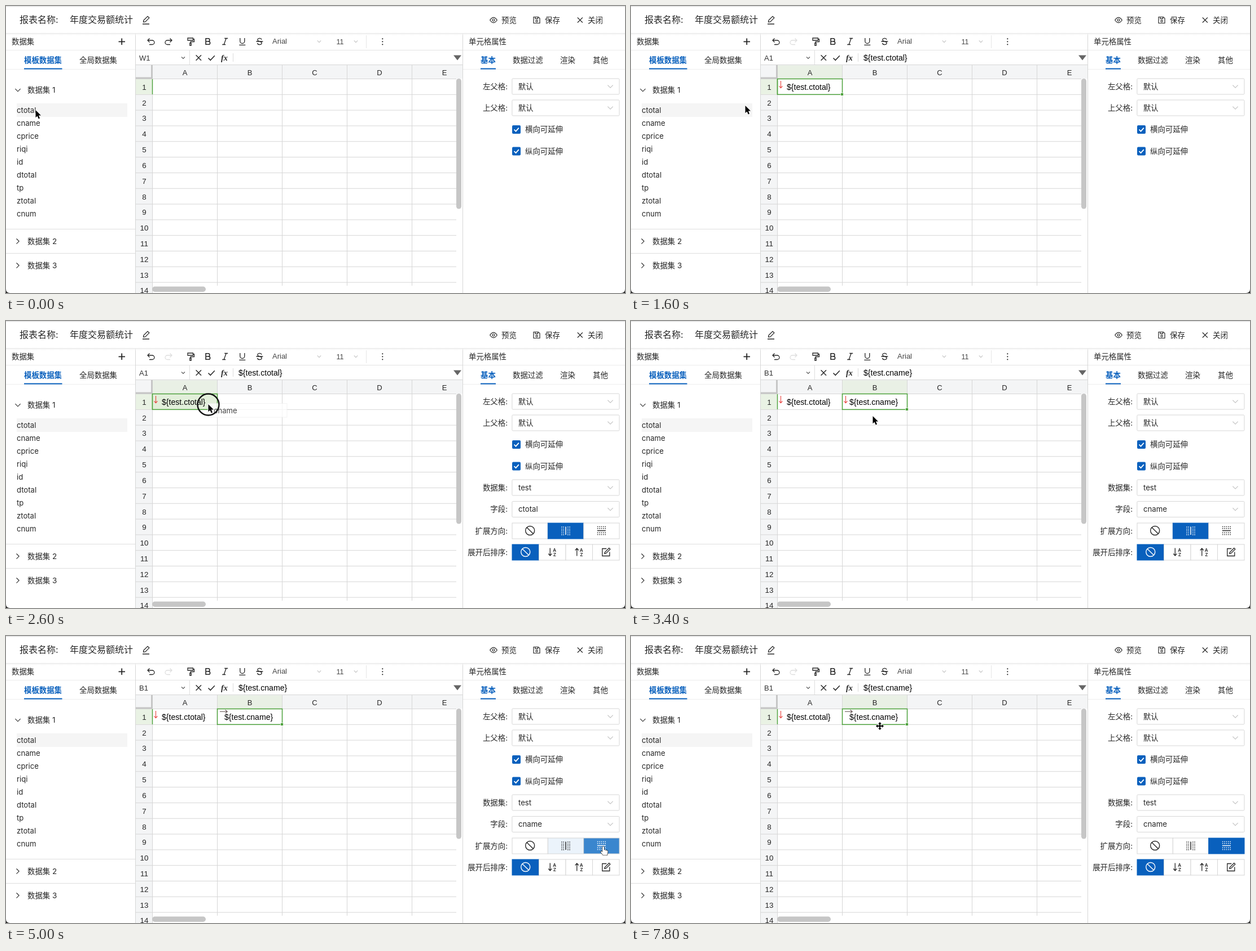
An HTML page that plays this animation: 1097 px wide and 510 px high, repeating every 8 s.

```html
<!DOCTYPE html>
<html lang="zh-CN">
<head>
<meta charset="utf-8">
<style>
  html, body { margin: 0; width: 100%; height: 100%; overflow: hidden; background: #fff; }
  svg { display: block; width: 1097px; height: 510px; }
  text { font-family: Inter, "Noto Sans CJK SC", "Noto Sans CJK", sans-serif; white-space: pre; }
  .sheet { font-family: "Liberation Sans", Arial, sans-serif; }
</style>
</head>
<body>
<svg id="stage" viewBox="0 0 1097 510" xmlns="http://www.w3.org/2000/svg"></svg>
<script>
const INK = '#262626', BLUE = '#0960bd', GREEN = '#4ba03a', LINE = '#d6d6d6';
const STEP = 200, LOOP = 8000;
const COL = 115, ROW = 27.82, LEFT = 259.5, TOP = 129.5;

// Drawing helpers; text is placed by its vertical centre.
const label = (x, cy, str, { size = 13.4, fill = INK, weight = 400, cls = '', anchor = 'start', extra = '' } = {}) =>
  `<text x="${x}" y="${cy + size * 0.365}" font-size="${size}" fill="${fill}" font-weight="${weight}" class="${cls}" text-anchor="${anchor}" ${extra}>${str}</text>`;
const cell = (x, cy, str, opt = {}) => label(x, cy, str, { size: 14.1, fill: '#000', cls: 'sheet', ...opt });
const rect = (x, y, w, h, fill, extra = '') =>
  `<rect x="${x}" y="${y}" width="${w}" height="${h}" fill="${fill}" ${extra}/>`;
const path = (d, stroke = INK, width = 1.2, extra = '') =>
  `<path d="${d}" fill="none" stroke="${stroke}" stroke-width="${width}" ${extra}/>`;
const at = (x, y, body, extra = '') => `<g transform="translate(${x} ${y}) ${extra}">${body}</g>`;
const hline = (x1, x2, y, color = LINE) => path(`M${x1} ${y}H${x2}`, color, 1);
const vline = (x, y1, y2, color = LINE) => path(`M${x} ${y1}V${y2}`, color, 1);
const chevron = (x, y, color, s = 4) => path(`M${x - s} ${y - s / 2}l${s} ${s}l${s} ${-s}`, color, 1.1);
const cross = (x, y, s, w) => path(`M${x - s} ${y - s}l${2 * s} ${2 * s}m0 ${-2 * s}l${-2 * s} ${2 * s}`, INK, w);

const icons = {
  pencil: path('M-6 7.5H6M-4.5 4L-4 .8L3 -6.2L5.8 -3.4L-1.2 3.6Z', INK, 1.3),
  eye: path('M-6.3 0Q0 -9.4 6.3 0Q0 9.4 -6.3 0Z') + '<circle r="2" fill="none" stroke="#262626" stroke-width="1.2"/>',
  save: path('M-5.5 -5.5H3L5.5 -3V5.5H-5.5ZM-2.5 -5.5V-2.3H2V-5.5') + '<circle cy="1.8" r="1.7" fill="none" stroke="#262626" stroke-width="1.1"/>',
  undo: path('M-2.5 -6L-6 -2.5L-2.5 1M-6 -2.5H2.2A3.7 3.7 0 0 1 2.2 5H-3', 'currentColor', 1.3),
  roller: path('M-5 -6H4.5V-2H-5ZM4.5 -4H6.5V.5H0V3M-1.2 3H1.2V7H-1.2Z', INK, 1.3),
  bold: path('M-3.5 -5.2H.7A2.5 2.5 0 0 1 .7 0H-3.5ZM-3.5 0H1.4A2.6 2.6 0 0 1 1.4 5.3H-3.5Z', INK, 1.6),
  italic: path('M-1 -5.5H5M-5 5.5H1M2 -5.5L-2 5.5', INK, 1.3),
  underline: path('M-4 -6V-.5A4 4 0 0 0 4 -.5V-6M-5.5 6.3H5.5', INK, 1.3),
  strike: path('M3.8 -3.4Q2.6 -5.8 0 -5.6Q-3.8 -5.2 -3.5 -2.6Q-3.2 -.8 0 0Q4 .8 3.8 3Q3.4 5.7 0 5.7Q-3.4 5.6 -4 3M-6 0H6', INK, 1.3),
  ban: path('M-8 0A8 8 0 1 1 8 0A8 8 0 1 1 -8 0M-5.6 -5.6L5.6 5.6', 'currentColor', 1.4),
  columns: path('M-7 -7V8M-3.8 -7V8M3.8 -7V8M7 -7V8', 'currentColor', 1.5, 'stroke-dasharray="1.5 1.9"') + path('M0 -7V7.5', 'currentColor', 1.5),
  rows: path('M-7.5 -7H8M-7.5 -3.8H8M-7.5 3.8H8M-7.5 7H8', 'currentColor', 1.5, 'stroke-dasharray="1.5 1.9"') + path('M-7.5 0H7.5', 'currentColor', 1.5),
  form: path('M1 -6H-6.5V7H6.5V0M-2.5 3L-2 .5L5.5 -7L7.5 -5L0 2.5Z', 'currentColor', 1.3),
};
const sortIcon = up =>
  path(up ? 'M-4 7V-6M-7 -3L-4 -6.5L-1 -3' : 'M-4 -7V6M-7 3L-4 6.5L-1 3', INK, 1.3) +
  label(4, -3.6, 'A', { size: 8, anchor: 'middle', weight: 600 }) + label(4, 4.4, 'Z', { size: 8, anchor: 'middle', weight: 600 });
const tinted = (x, y, icon, color) => `<g color="${color}">${at(x, y, icon)}</g>`;

function header() {
  return rect(0, 0, 1097, 48, '#fff') + hline(0, 1097, 0.8, '#d4d4d4') +
    label(24, 24, '报表名称:', { size: 16 }) + label(113, 24, '年度交易额统计', { size: 16 }) +
    at(248, 24.5, icons.pencil) + at(864, 25, icons.eye) + at(940.5, 25, icons.save) + cross(1017.3, 25, 4.5, 1.2) +
    label(878, 25, '预览') + label(955, 25, '保存') + label(1031, 25, '关闭') +
    rect(0, 48, 1097, 5, 'url(#shade)');
}

function datasets() {
  const fields = ['ctotal', 'cname', 'cprice', 'riqi', 'id', 'dtotal', 'tp', 'ztotal', 'cnum'];
  return label(10, 63, '数据集', { weight: 500 }) + path('M199.5 63.3H211M205.2 57.5V69', INK, 1.8) +
    hline(0, 229, 78.5, '#ebebeb') + hline(0, 229, 112.5, '#ededed') +
    label(32, 96, '模板数据集', { fill: BLUE, weight: 700 }) + label(130, 96, '全局数据集') +
    rect(32, 110.5, 67.5, 2, BLUE) +
    chevron(21, 149.5, INK, 4.6) + label(38, 149, '数据集 1') +
    rect(19, 173, 196, 24, '#f5f5f5') +
    fields.map((name, i) => label(19, 185 + i * 23.05, name, { size: 13.1 })).join('') +
    [2, 3].map((n, i) => hline(0, 229, 396.5 + i * 43, '#dedede') +
      path(`M18.5 ${413.5 + i * 43}l4.6 4.6l-4.6 4.6`, INK, 1.1) + label(38, 418 + i * 43, `数据集 ${n}`)).join('') +
    vline(229.5, 49, 510);
}

function toolbar() {
  const tools = ['roller', 'bold', 'italic', 'underline', 'strike'];
  return tinted(257, 63.5, icons.undo, INK) +
    tools.map((name, i) => at(327 + i * 30.6, 63, icons[name])).join('') +
    label(472, 62, 'Arial', { size: 13, cls: 'sheet', fill: '#444' }) + chevron(555, 63, '#c4c4c4', 3.2) +
    label(585.5, 63.5, '11', { size: 12.5, cls: 'sheet', fill: '#444' }) + chevron(620, 63, '#c4c4c4', 3.2) +
    vline(638.5, 52, 75, '#e6e6e6') +
    [-5, 0, 5].map(d => `<circle cx="667.3" cy="${63.3 + d}" r="1.1" fill="${INK}"/>`).join('') +
    hline(230, 809, 78.5, '#e2e2e2') + vline(325.5, 79, 104, '#dedede') + chevron(314, 92, '#555', 3) +
    cross(341.3, 92, 4.7, 1.4) + path('M358.5 92.5l3.8 3.8l7.5 -8', INK, 1.5) +
    label(381, 91.5, 'fx', { size: 14, weight: 700, extra: 'font-style="italic" style="font-family:\'Liberation Serif\',serif"' }) +
    vline(402.5, 84, 99, '#dcdcdc') + '<path d="M793 87.5H807L800 96.5Z" fill="#666"/>';
}

function grid() {
  let out = rect(230, 105, 579, 24.5, '#f4f5f6') + rect(230, 129.5, 29.5, 380.5, '#f4f5f6') + hline(230, 809, 104.5);
  for (let i = 0; i < 14; i++) {
    const y = TOP + i * ROW;
    out += hline(230, 798, y) + cell(245, y + 14.4, i + 1, { size: 13.4, anchor: 'middle', fill: INK });
  }
  for (let i = 0; i < 5; i++) {
    const x = LEFT + i * COL;
    out += vline(x, 105, 497) + cell(x + COL / 2, 118, 'ABCDE'[i], { size: 13, anchor: 'middle', fill: INK });
  }
  return out + vline(LEFT, 497, 510) + rect(257, 105, 3, 24, '#c6c6c6') + rect(230, 126.5, 30, 3, '#c6c6c6') +
    rect(798, 129, 11, 381, '#fff') + rect(260, 497, 549, 13, '#fff') +
    rect(798, 129, 9, 231.5, '#c6c6c6', 'rx="4.5"') + rect(259, 498.5, 95, 9.5, '#c6c6c6', 'rx="4.7"') +
    vline(809.5, 49, 510);
}

const select = (cy, value) =>
  rect(896.9, cy - 14, 190, 28, '#fff', `rx="1.5" stroke="${LINE}"`) + label(908, cy, value, { size: 13.2 }) + chevron(1071, cy, '#bdbdbd', 4.6);
const caption = (cy, str) => label(889, cy, str + ':', { anchor: 'end' });

function properties() {
  const check = (cy, str) => rect(897, cy - 7.5, 15, 15, BLUE, 'rx="2"') +
    path(`M900.5 ${cy}l3 3.2l5.3 -6`, '#fff', 1.8) + label(920, cy, str);
  return label(820, 63, '单元格属性', { weight: 500 }) + hline(810, 1097, 78.5, '#ebebeb') + hline(810, 1097, 112.5, '#ededed') +
    label(841, 96, '基本', { fill: BLUE, weight: 700 }) + rect(841, 110.5, 27, 2, BLUE) +
    label(898, 96, '数据过滤') + label(982, 96, '渲染') + label(1040, 96, '其他') +
    caption(143, '左父格') + select(143, '默认') + caption(181, '上父格') + select(181, '默认') +
    check(219.5, '横向可延伸') + check(258, '纵向可延伸');
}

function buttons(cy, items) {
  const w = 190 / items.length;
  return items.map(([icon, fill, color], i) => {
    const x = 897 + i * w;
    return rect(x, cy - 14, w, 28, fill, `stroke="${fill === BLUE ? BLUE : LINE}"`) + tinted(x + w / 2, cy - 0.5, icon, color);
  }).join('');
}

function fieldPanel(t) {
  if (t < 1800) return '';
  const field = t < 3200 ? 'ctotal' : 'cname';
  const on = [BLUE, '#fff'], off = ['#fff', INK];
  let cols = on, rows = off;
  if (t >= 4400) rows = ['#fff', BLUE];
  if (t >= 5000) { cols = ['#ebf3fb', INK]; rows = ['#3a86ce', '#fff']; }
  if (t >= 5200) { cols = off; rows = on; }
  return caption(296, '数据集') + select(296, 'test') + caption(334.5, '字段') + select(334.5, field) +
    caption(373, '扩展方向') + buttons(373, [[icons.ban, ...off], [icons.columns, ...cols], [icons.rows, ...rows]]) +
    caption(411, '展开后排序') +
    buttons(411, [[icons.ban, ...on], [sortIcon(false), ...off], [sortIcon(true), ...off], [icons.form, ...off]]);
}

const downArrow = x => path(`M${x} 133V145.5m-3 -3.2l3 3.4l3 -3.4`, '#e8403c', 1.1);
const rightArrow = path('M379 134.3H392m-3.4 -3l3.6 3l-3.6 3', '#5c4a4a', 1.1);

function sheetState(t) {
  const filledA = t >= 1000, filledB = t >= 3000;
  const active = filledB ? 1 : filledA ? 0 : -1;
  const hover = t === 800 || t === 2600 ? 0 : t === 2800 ? 1 : -1;
  let out = rect(230, 130, 29, ROW - 1, '#e9f2e4') + cell(245, 144, '1', { size: 13.4, anchor: 'middle', fill: INK }) +
    path(`M${LEFT} 130V157`, GREEN, 1.4);
  if (hover >= 0) out += rect(LEFT + hover * COL, TOP, COL, ROW, '#e2efda');
  if (active >= 0) {
    const x = LEFT + active * COL;
    out += rect(x + 0.5, 105.5, COL - 1, 23.5, '#e9f0e5') +
      cell(x + COL / 2, 118, 'AB'[active], { size: 13, anchor: 'middle', fill: INK }) +
      rect(x, TOP, COL, ROW, 'none', `stroke="${GREEN}" stroke-width="1.5"`) +
      rect(x + COL - 3, TOP + ROW - 3, 5, 5, GREEN, 'stroke="#fff" stroke-width=".8"');
  }
  if (filledA) out += downArrow(265.5) + cell(276, 144, '${test.ctotal}');
  if (filledB) out += (t < 5000 ? downArrow(380.5) : rightArrow) + cell(387, 144, '${test.cname}');
  return out + label(236, 92, ['W1', 'A1', 'B1'][active + 1], { size: 13, cls: 'sheet', fill: '#333' }) +
    (active < 0 ? '' : cell(412, 91.5, active ? '${test.cname}' : '${test.ctotal}')) +
    `<g color="${active < 0 ? INK : '#dedede'}">${at(288, 63.5, icons.undo, 'scale(-1 1)')}</g>`;
}

// Pointer path: time, x, y
const route = [
  [0, 52, 185], [400, 54, 186], [600, 175, 190], [800, 262, 146], [1000, 277, 143], [1400, 270, 160],
  [1600, 202, 177], [1800, 70, 204], [2000, 50, 207], [2200, 118, 196], [2400, 190, 182], [2600, 358, 148],
  [2800, 401, 138], [3000, 412, 146], [3400, 428, 169], [3600, 460, 190], [4400, 1057, 374], [6000, 1057, 374],
  [6200, 760, 295], [6400, 490, 207], [6800, 400, 165], [7200, 348, 154], [7400, 348, 154], [7600, 398, 147], [7800, 441, 160],
];
function pointerAt(t) {
  const i = route.findIndex(p => p[0] >= t);
  if (i <= 0) return route[0].slice(1);
  const [a, b] = [route[i - 1], route[i]], k = (t - a[0]) / (b[0] - a[0]);
  return [a[1] + (b[1] - a[1]) * k, a[2] + (b[2] - a[2]) * k];
}
const outlined = (d, fill, stroke, w) =>
  `<path d="${d}" fill="${fill}" stroke="${stroke}" stroke-width="${w}" stroke-linejoin="round" paint-order="stroke"/>`;
const cursors = {
  arrow: outlined('M.5 0V13.2L3.6 10.4L5.7 15.4L8 14.4L5.9 9.6H10Z', '#000', '#fff', 1.6),
  hand: outlined('M0 1Q1.5 -1 3 1V6L8.5 7.2Q10 7.8 9.5 10L8.3 15.5H1.2L-3 10Q-3.2 8.2 -1.4 8.6L0 9.8Z', '#fff', '#000', 1.2),
  move: outlined('M0 -7L3 -3.8H1V-1H3.8V-3L7 0L3.8 3V1H1V3.8H3L0 7L-3 3.8H-1V1H-3.8V3L-7 0L-3.8 -3V-1H-1V-3.8H-3Z', '#000', '#fff', 1.6),
};

const within = (t, a, b) => t >= a && t <= b;
function pointer(t) {
  const [x, y] = pointerAt(t);
  const dragging = within(t, 400, 800) ? 'ctotal' : within(t, 2200, 2800) ? 'cname' : '';
  const pressed = dragging || within(t, 200, 800) || within(t, 2000, 2800) || within(t, 4600, 4800);
  const shape = within(t, 4400, 6000) ? 'hand' : t >= 7800 ? 'move' : 'arrow';
  return at(x, y,
    (dragging ? rect(0, -1.5, 140, 24.5, '#fff', 'opacity=".75" stroke="#eee"') + label(10, 11, dragging, { size: 13.1, fill: '#444' }) : '') +
    (pressed ? '<circle cx=".5" cy=".5" r="19" fill="none" stroke="#111" stroke-width="2.4"/>' : '') + cursors[shape]);
}

const stage = document.getElementById('stage');
stage.innerHTML = `<defs><linearGradient id="shade" x2="0" y2="1"><stop stop-color="#e6e6e6"/><stop offset="1" stop-color="#fff" stop-opacity="0"/></linearGradient></defs>` +
  rect(0, 0, 1097, 510, '#fff') + datasets() + toolbar() + grid() + properties() + header() +
  '<path d="M0 503Q0 510 7 510H0ZM1097 503Q1097 510 1090 510H1097Z" fill="#222"/><g id="live"></g>';
const live = document.getElementById('live');

let shown = -1;
function render(now) {
  const t = Math.floor((now % LOOP) / STEP) * STEP;
  if (t !== shown) {
    live.innerHTML = sheetState(t) + fieldPanel(t) + pointer(t);
    shown = t;
  }
}
const start = performance.now();
function tick() {
  render(performance.now() - start);
  requestAnimationFrame(tick);
}
tick();
</script>
</body>
</html>
```
